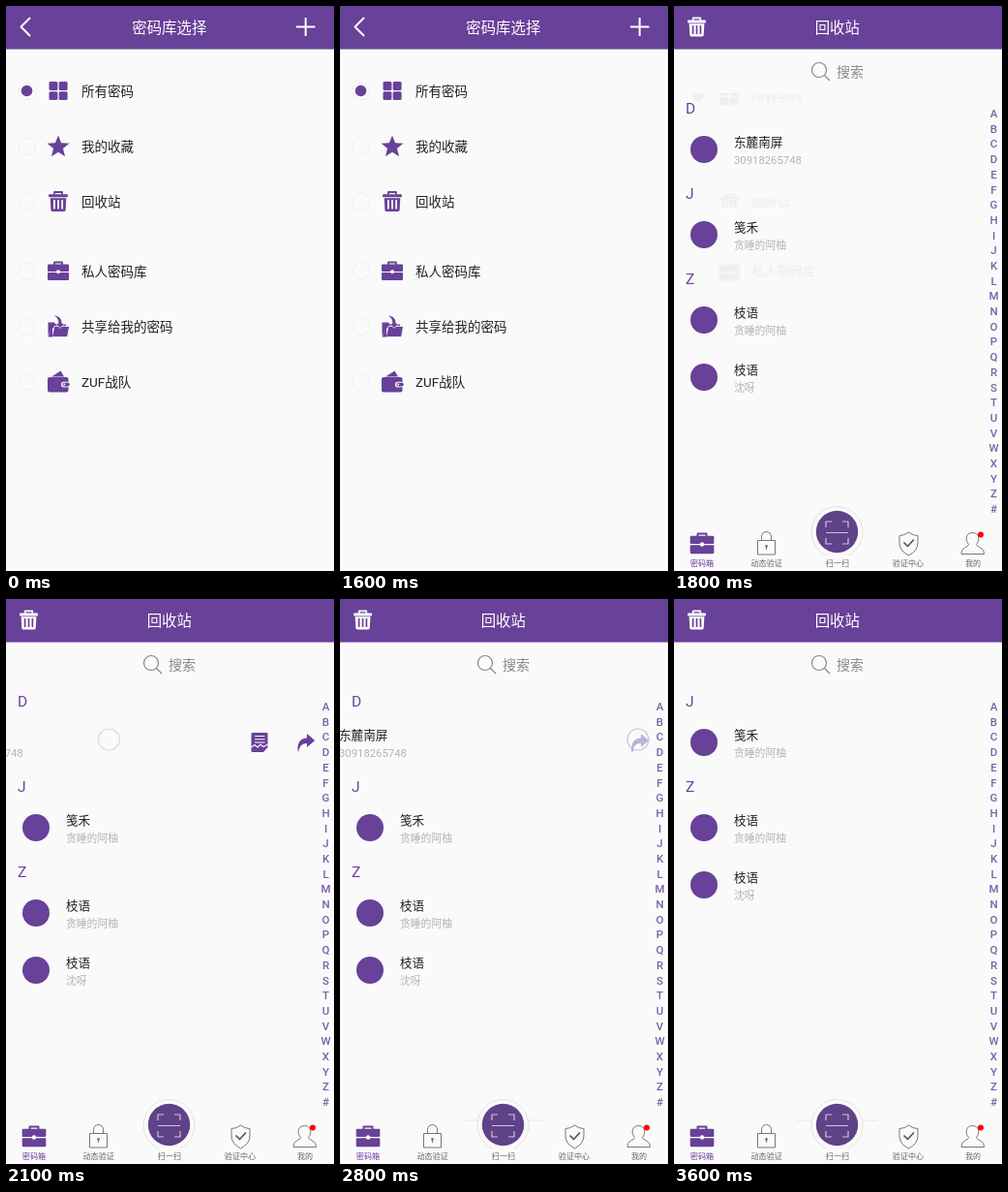
Write an HTML page that moves like this. It is 339 px wide and 583 px high and loops after 4.6 s.

```html
<!DOCTYPE html>
<html lang="zh-CN">
<head>
<meta charset="utf-8">
<style>
html, body { margin: 0; width: 100%; height: 100%; overflow: hidden; background: #fafafa }
svg { display: block; width: 100vw; height: 100vh }
text { font-family: Roboto, "Noto Sans CJK SC", "Noto Sans CJK", sans-serif }
</style>
</head>
<body>
<svg id="stage" viewBox="0 0 339 583"></svg>
<script>
const PURPLE = '#684198', PAPER = '#fafafa', GREY = '#b4b4b4';
const LOOP = 4600, STEP = 100;

// Text placed by the vertical centre of its glyphs
const text = (s, x, y, size, fill, anchor = 'start', weight = 400) =>
  `<text x="${x}" y="${y + size * (/[\u4e00-\u9fff]/.test(s) ? .38 : .355)}" font-size="${size}" fill="${fill}" text-anchor="${anchor}" font-weight="${weight}">${s}</text>`;
const rect = (x, y, w, h, fill, rx = 0) =>
  `<rect x="${x}" y="${y}" width="${w}" height="${h}" rx="${rx}" fill="${fill}"/>`;
const circle = (x, y, r, fill, stroke = 'none', width = 1) =>
  `<circle cx="${x}" cy="${y}" r="${r}" fill="${fill}" stroke="${stroke}" stroke-width="${width}"/>`;
const path = (d, fill) => `<path d="${d}" fill="${fill}" fill-rule="evenodd"/>`;
const line = (d, stroke, width = 1) =>
  `<path d="${d}" fill="none" stroke="${stroke}" stroke-width="${width}" stroke-linejoin="round"/>`;
const group = (x, y, body, scale = 1) => `<g transform="translate(${x} ${y}) scale(${scale})">${body}</g>`;

const starPath = 'M' + Array.from({ length: 10 }, (_, i) => {
  const r = i % 2 ? 5.2 : 12, a = i * Math.PI / 5;
  return `${(r * Math.sin(a)).toFixed(2)},${(1 - r * Math.cos(a)).toFixed(2)}`;
}).join('L') + 'Z';

const icons = {
  grid: c => [[-9.5, -9.5], [.7, -9.5], [-9.5, .7], [.7, .7]].map(([x, y]) => rect(x, y, 8.9, 8.9, c, 1.5)).join(''),
  star: c => path(starPath, c),
  trash: c => line('M-4-7V-9.5H4V-7', c, 1.8) + rect(-10, -7.3, 20, 3, c, 1) +
    path('M-8.3-3.3H8.3L7.6 9Q7.5 10.5 6 10.5H-6Q-7.5 10.5-7.6 9ZM-5-1.5V8H-3.2V-1.5ZM-.9-1.5V8H.9V-1.5ZM3.2-1.5V8H5V-1.5Z', c),
  briefcase: c => line('M-4-6V-8.5H4V-6', c, 1.8) + rect(-11, -6.5, 22, 7.5, c, 1) +
    rect(-11, 2, 22, 8, c, 1) + circle(0, 1.3, 2, PAPER),
  folder: c => path('M-10.5 10V-4H-4L-2-2H8V2H-6Z', c) +
    `<g stroke="${PAPER}" stroke-width=".8">${path('M-6.5 11L-4 0H11.5L9.5 11Z', c)}${path('M-5-11.5C2-11 4-7 4-3H7L2 2-3-3H0C0-6-1-9-5-11.5Z', c)}</g>` +
    path('M-10.5 11L-6 1V11Z', c),
  wallet: c => path('M-7-5L2.5-11 6-5Z', c) + rect(-11, -4.5, 21.5, 15.5, c, 2) +
    rect(3, .3, 8.5, 5.6, PAPER, 2.5) + rect(4.3, 1.3, 7.5, 3.6, c, 1.8) + circle(6.3, 3.1, 1, PAPER),
  shred: c => path('M-8.5-9Q-8.5-10-7.5-10H7.5Q8.5-10 8.5-9V5L4 10H-7.5Q-8.5 10-8.5 9Z', c) +
    line('M-5-6.5H5.5M-5-3.3H5.5M-5 0H5.5M-8.5 5L-5 2.5-2 5 1 2 4 4.5 8.5 2', PAPER, 1.1),
  share: c => path('M-8 10C-10 0-6-5.5 1-5.5V-10L9.2-3 1 4V0C-4-.5-7 3-8 10Z', c)
};

const header = (title, extra) => rect(0, 0, 339, 44.6, PURPLE) + text(title, 168.8, 22, 15.4, '#fff', 'middle') + extra;

function vaultPage() {
  const rows = [[88, 'grid', '所有密码'], [145, 'star', '我的收藏'], [202, 'trash', '回收站'],
    [273.5, 'briefcase', '私人密码库'], [331, 'folder', '共享给我的密码'], [388, 'wallet', 'ZUF战队']];
  return header('密码库选择', line('M25 12L15.5 21.5 25 31M300 21.5H319.5M309.7 12V31', '#fff', 2)) +
    rows.map(([y, icon, label], i) => circle(21.5, y, 8.7, 'none', '#f0eff2') +
      (i ? '' : circle(21.5, y - .5, 5.8, PURPLE)) +
      group(54, y - .5, icons[icon](PURPLE)) + text(label, 78, y, 13.5, '#222')).join('');
}

const section = (letter, y) => text(letter, 12, y, 15.5, PURPLE);
const row = (y, name, note, id = '') => `<g id="${id}">` + rect(0, y - 28, 339, 58, PAPER) +
  circle(31, y, 14, PURPLE) + text(name, 62, y - 8, 12.6, '#222') +
  text(note, 62, y + 10.7, /\d/.test(note) ? 11.3 : 10.8, GREY) + '</g>';

function navBar() {
  const ink = '#777';
  return rect(0, 530, 339, 53, PAPER) +
    `<g id="edge">${line('M127 538H210', '#e2e2e2', .8)}</g>` +
    circle(168.5, 543, 26.5, PAPER, '#e2e2e2') + rect(130, 567, 80, 16, PAPER) +
    circle(168.5, 542.5, 21.7, '#5f4287') +
    line('M157 538V532H163M174 532H180V538M180 549V555H174M163 555H157V549M157 543.5H180', '#cfc4de', 1.2) +
    group(29, 554, icons.briefcase(PURPLE), 1.12) +
    line('M86.5 551.5H104.5V566H86.5ZM90.5 551V547.5A5 5 0 0 1 100.5 547.5V551M95.5 558V561', ink) +
    circle(95.5, 557.5, 1.4, ink) +
    line('M242.5 543Q247 546.5 252 546.5V554Q252 562 242.5 567 233 562 233 554V546.5Q238 546.5 242.5 543Z', ink) +
    line('M237.5 553.5L241.5 557.5 248 550.5', '#555', 1.7) +
    line('M304.5 555.5C300.5 551 301.5 543.5 308.5 543.5S316.5 551 312.5 555.5C313 559 320.5 558 320.5 565.5H297C297 558 304 559 304.5 555.5Z', ink) +
    circle(317, 545.5, 3, '#f00') +
    [['密码箱', 29], ['动态验证', 95.7], ['扫一扫', 169], ['验证中心', 242], ['我的', 309]]
      .map(([s, x], i) => text(s, x, 574.5, 8.1, i ? '#666' : PURPLE, 'middle')).join('');
}

function binPage() {
  const letters = [...'ABCDEFGHIJKLMNOPQRSTUVWXYZ#'];
  return `<g id="first">${section('D', 105)}<g id="actions">${rect(225, 120, 114, 58, PAPER)}` +
    group(262, 148, icons.shred(PURPLE)) + group(310, 149, icons.share(PURPLE)) + '</g>' +
    row(148, '东麓南屏', '30918265748', 'swiped') + '</g>' +
    `<g id="rest">${section('J', 193)}${row(236, '笺禾', '贪睡的阿柚')}${section('Z', 281)}` +
    row(324, '枝语', '贪睡的阿柚') + row(383, '枝语', '沈呀') + '</g>' +
    rect(0, 44, 339, 46, PAPER) + circle(150, 66, 7.5, 'none', '#888', 1.2) +
    line('M155.5 71.5L161 77', '#888', 1.2) + text('搜索', 168, 67.6, 14, '#888') +
    letters.map((c, i) => text(c, 330.5, 111 + i * 15.69, 11.5, '#7d5ea8', 'middle', 500)).join('') +
    header('回收站', group(23.5, 21.5, icons.trash('#fff'), .95)) + navBar();
}

const $ = id => document.getElementById(id);
$('stage').innerHTML = rect(0, 0, 339, 583, PAPER) +
  `<g id="vault">${vaultPage()}</g><g id="bin">${binPage()}</g>` +
  `<circle id="touch" r="11" fill="${PAPER}" fill-opacity=".6" stroke-width="1.2"/>`;

// Each track lists [start ms, ...values], held until the next start
const held = (track, t) => track.filter(k => k[0] <= t).pop().slice(1);
const shiftTrack = [[0, 0], [2000, -50], [2100, -114], [2400, -96], [2700, -85], [2800, -63], [3300, 0]];
const touchTrack = [[0, 198, 197, 0], [700, 198, 197, .5], [800, 198, 197, 1], [1500, 198, 197, .4],
  [1600, 198, 197, 0], [1900, 220, 145, 1], [2000, 165, 145, 1], [2100, 106.5, 145, 1],
  [2400, 308, 145, 0], [2600, 308, 145, 1], [3300, 308, 145, 0]];
const fadeTrack = [[0, 1, 0, 1], [1700, .5, .6, .987], [1800, .07, 1, .974], [1900, 0, 1, .96]];

function draw(t) {
  const [vault, bin, scale] = held(fadeTrack, t);
  $('vault').setAttribute('opacity', vault);
  $('vault').setAttribute('transform', `translate(169.5 291.5) scale(${scale}) translate(-169.5 -291.5)`);
  $('bin').setAttribute('opacity', bin);

  const [shift] = held(shiftTrack, t);
  $('swiped').setAttribute('transform', `translate(${shift} 0)`);
  $('actions').setAttribute('opacity', shift ? 1 : 0);

  const removed = Math.min(1, Math.max(0, (t - 3300) / 300));
  $('first').setAttribute('opacity', Math.max(0, 1 - removed * 1.5));
  $('rest').setAttribute('transform', `translate(0 ${-88 * removed * removed * (3 - 2 * removed)})`);
  $('edge').setAttribute('opacity', t >= 2400 ? 1 : 0);

  const [x, y, alpha] = held(touchTrack, t), touch = $('touch');
  touch.setAttribute('cx', x);
  touch.setAttribute('cy', y);
  touch.setAttribute('opacity', alpha);
  touch.setAttribute('stroke', t >= 1900 && t < 2400 ? '#dcdcdc' : '#cbc4e2');
}

const start = performance.now();
function tick() {
  const t = (performance.now() - start) % LOOP;
  draw(Math.floor(t / STEP) * STEP);
  requestAnimationFrame(tick);
}
tick();
</script>
</body>
</html>
```
